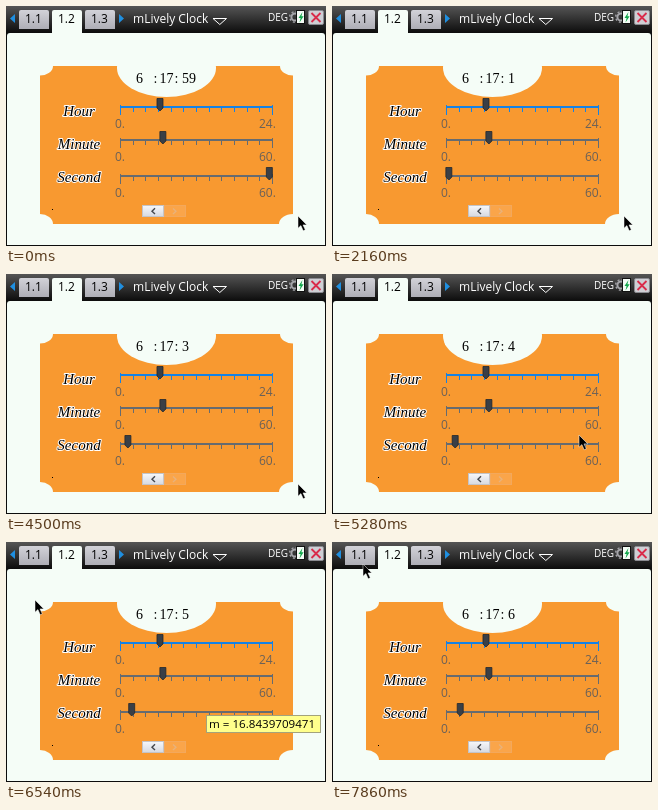
Animation, 320 px wide and 240 px high, one loop 8000 ms. Source, as an HTML page:

```html
<!DOCTYPE html>
<html lang="en">
<head>
<meta charset="utf-8">
<title>Clock</title>
<style>
html, body { margin: 0; width: 100%; height: 100%; overflow: hidden; background: #f5fdf7; }
svg { display: block; width: 100vw; height: 100vh; }
text { font: 12px "Open Sans", "Noto Sans", sans-serif; white-space: pre; }
.time text { font: 14px "Liberation Serif", serif; }
.label { font: italic 15px "Liberation Serif", serif; text-anchor: middle;
  stroke: #fff; stroke-width: 2px; stroke-linejoin: round; paint-order: stroke; }
.crisp { shape-rendering: crispEdges; }
</style>
</head>
<body>
<svg viewBox="0 0 320 240">
  <defs>
    <linearGradient id="bar" x2="0" y2="1">
      <stop offset="0" stop-color="#555"/><stop offset="1" stop-color="#0c0c0c"/>
    </linearGradient>
    <linearGradient id="tab" x2="0" y2="1">
      <stop offset="0" stop-color="#d2d2d8"/><stop offset="1" stop-color="#aeaeb6"/>
    </linearGradient>
    <linearGradient id="btn" x2="0" y2="1">
      <stop offset="0" stop-color="#f6f7fa"/><stop offset="1" stop-color="#d6d9e0"/>
    </linearGradient>
    <clipPath id="card"><rect x="34" y="60" width="253" height="158"/></clipPath>
    <path id="knob" d="M-3 -8.5H3V1L0 4L-3 1Z" fill="#3a3f46" stroke="#23272c" stroke-width=".8"/>
  </defs>

  <rect class="crisp" width="320" height="240" fill="#0c0c0c"/>
  <rect width="320" height="27" fill="url(#bar)"/>
  <path d="M1 30Q1 27 4 27H316Q319 27 319 30V239H1Z" fill="#f5fdf7"/>

  <g id="tabs"></g>
  <path d="M9 8V17L4 12.5ZM113 8V17L118 12.5Z" fill="#1f8fe0"/>
  <text x="127" y="16.5" fill="#fff">mLively Clock</text>
  <path d="M207 12.5H220.5L213.8 18.5Z" fill="none" stroke="#fff"/>
  <text x="262" y="14.5" fill="#fff" style="font-size:10px">DEG</text>
  <circle cx="289" cy="11" r="3.6" fill="none" stroke="#a5a5aa" stroke-width="2"/>
  <circle cx="289" cy="11" r="5.3" fill="none" stroke="#a5a5aa" stroke-width="1.4" stroke-dasharray="2 2.16"/>
  <rect x="290.5" y="4.5" width="8" height="13" fill="#f4fbf5" stroke="#111"/>
  <path d="M296.5 6L292.5 12H294.6L293.5 16.5L297.6 10.3H295.4Z" fill="#12a84c"/>
  <rect x="302.5" y="4.5" width="15" height="14" rx="1.5" fill="#cfcfd4" stroke="#8a8a90"/>
  <path d="M305.5 7L314.5 16M314.5 7L305.5 16" stroke="#d92b4a" stroke-width="1.8"/>

  <g clip-path="url(#card)">
    <rect x="34" y="60" width="253" height="158" fill="#f89930"/>
    <g fill="#f5fdf7">
      <ellipse cx="160.5" cy="62" rx="49.5" ry="29"/>
      <ellipse cx="34" cy="60" rx="13" ry="9.5"/>
      <ellipse cx="287" cy="60" rx="13" ry="9.5"/>
      <ellipse cx="34" cy="218" rx="13" ry="10"/>
      <ellipse cx="287" cy="218" rx="14" ry="10"/>
    </g>
  </g>
  <rect class="crisp" x="46" y="203" width="1" height="1"/>

  <g class="time">
    <text x="130" y="77">6</text>
    <text x="147.5" y="77">:</text>
    <text x="153.5" y="77">17</text>
    <text x="168.5" y="77">:</text>
    <text id="shown" x="176" y="77"></text>
  </g>
  <g id="sliders"></g>

  <rect x="158.5" y="199.5" width="21" height="11" fill="#faa54a" stroke="#f3a85c"/>
  <path d="M167 202.5L170 205.2L167 208" fill="none" stroke="#e8b27c" stroke-width="1.3"/>
  <rect x="136.5" y="199.5" width="21" height="11" fill="url(#btn)" stroke="#c4c4c8"/>
  <path d="M149 202.3L146 205.2L149 208" fill="none" stroke="#44474d" stroke-width="1.4"/>

  <g id="tip">
    <rect x="200.5" y="173.5" width="114" height="17" fill="#ffff8c" stroke="#a3a37c"/>
    <text x="203" y="186" style="font-size:11.6px">m = 16.8439709471</text>
  </g>
  <path id="cursor" d="M0 0V12.2L2.9 9.6L5.2 14.8L7.3 13.8L5 8.9H8.8Z" stroke="#fff" stroke-width=".5"/>
</svg>
<script>
const LOOP = 8000, TICK = 60, HALF_SECOND = 580;
const $ = id => document.getElementById(id);

// key points of the pointer: time, x, y
const path = [
  [4980, 292, 210], [5280, 247, 161], [5340, 247, 161], [5520, 101, 148], [5640, 90, 147],
  [6060, 90, 147], [6540, 29, 58], [6660, 29, 58], [7020, 28, 1], [7440, 31, 22]
];

function pointerAt(t) {
  const i = path.findIndex(p => p[0] > t);
  if (i < 1) return path.at(i).slice(1);
  const [a, b] = [path[i - 1], path[i]];
  const k = (t - a[0]) / (b[0] - a[0]);
  return [1, 2].map(n => Math.round(a[n] + (b[n] - a[n]) * k));
}

// the timer advances by half seconds and restarts after 60
function secondAt(t) {
  const value = 58.95 + Math.floor((t - 400) / HALF_SECOND + 1) / 2;
  return value > 60 ? value - 59.94 : value;
}

$("tabs").innerHTML = ["1.1", "1.2", "1.3"].map((name, i) => {
  const x = 13 + i * 33, on = i === 1, end = on ? 28 : 23;
  return `<path d="M${x} ${end}V6Q${x} 4 ${x + 2} 4H${x + 28}Q${x + 30} 4 ${x + 30} 6V${end}Z"
    fill="${on ? "#f5fdf7" : "url(#tab)"}"/><text x="${x + 6}" y="17">${name}</text>`;
}).join("");

const knobX = (value, max) => 114.3 + value / max * 151.7;

function slider(name, y, labelY, value, max, color) {
  let ticks = `M114.5 ${y - 2}V${y + 8}M266.5 ${y - 2}V${y + 8}`;
  for (let i = 1; i < 12; i++) ticks += `M${Math.round(114 + i * 152 / 12) + .5} ${y}V${y + 5}`;
  return `<text class="label" x="73" y="${labelY}">${name}</text>
    <path class="crisp" d="M114 ${y}H267" stroke="${color}" stroke-width="2"/>
    <path class="crisp" d="${ticks}" stroke="${color}"/>
    <g fill="#6b6158"><text x="109" y="${y + 20.5}">0.</text><text x="253" y="${y + 20.5}">${max}.</text></g>
    <use id="${name}" href="#knob" transform="translate(${knobX(value, max)} ${y})"/>`;
}

$("sliders").innerHTML =
  slider("Hour", 101, 109.5, 6.28, 24, "#1482e6") +
  slider("Minute", 134, 142.5, 16.844, 60, "#666b70") +
  slider("Second", 170, 175.5, 59, 60, "#666b70");

function draw(t) {
  const second = secondAt(t);
  $("shown").textContent = Math.round(second);
  $("Second").setAttribute("transform", `translate(${knobX(second, 60)} 170)`);
  $("cursor").setAttribute("transform", `translate(${pointerAt(t)})`);
  $("tip").setAttribute("opacity", t >= 5400 && t < 7800 ? 1 : 0);
}

const start = performance.now();
function frame() {
  const t = (performance.now() - start) % LOOP;
  draw(Math.floor(t / TICK) * TICK);
  requestAnimationFrame(frame);
}
frame();
</script>
</body>
</html>
```
